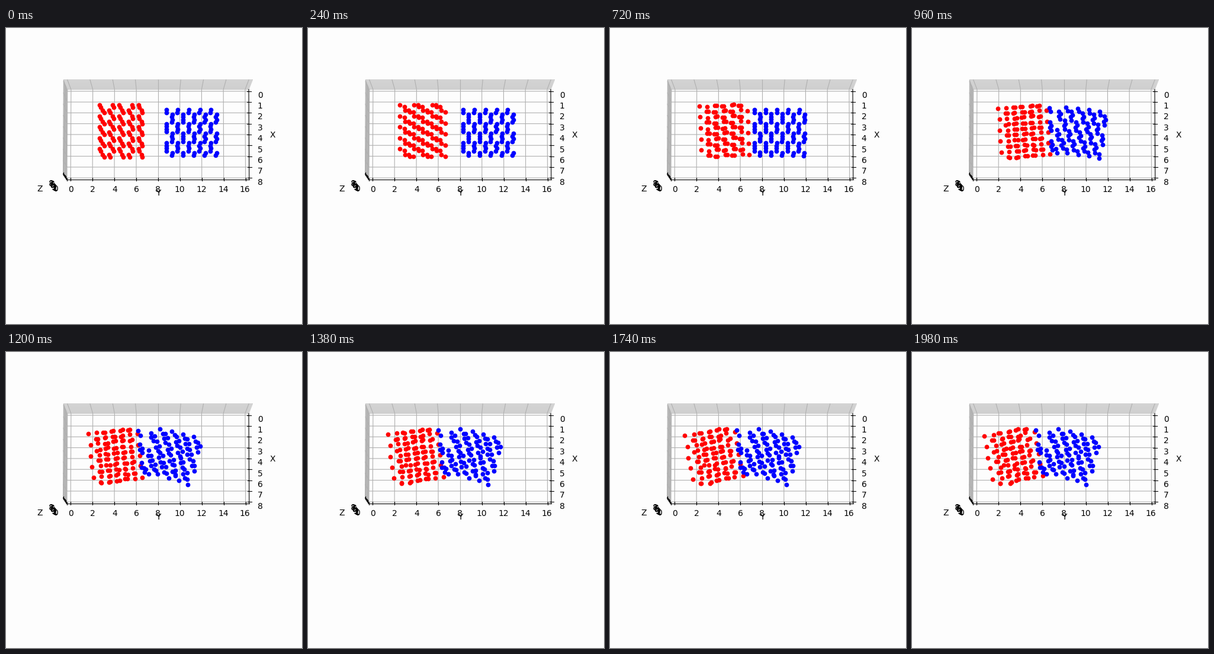
Recreate the animation shown at these times as a matplotlib script. Size 500 by 500 pixels, loop 2040 ms.

```python
import numpy as np
import matplotlib.pyplot as plt
from matplotlib.animation import FuncAnimation

FRAMES, STEP = 34, 60
BG = "#fdfdfd"

fig = plt.figure(figsize=(5, 5), dpi=100, facecolor=BG)
ax = fig.add_axes([0, 0, 1, 1])
ax.set(xlim=(0, 500), ylim=(500, 0))
ax.axis("off")

# ---- box seen from almost straight above ----
TILT = np.radians(85)
LO, HI = -1 / 6, 49 / 6          # x and z limits; y is twice as long


def proj(x, y, z):
    wx = ((x / 2 - LO) / (HI - LO) - 0.5) * 1.143
    wy = (y - 8) / (2 * (HI - LO)) * 1.143
    wz = ((z / 2 - LO) / (HI - LO) - 0.5) * 0.857
    up = wz * np.cos(TILT) - wx * np.sin(TILT)
    depth = 10 - wx * np.cos(TILT) - wz * np.sin(TILT)
    return 256.9 + 2805 * wy / depth, 243.5 - 2805 * up / depth


def path(*pts, color="#b0b0b0", order=1):
    xs, ys = zip(*(proj(*p) for p in pts))
    ax.plot(xs, ys, color=color, lw=0.8, zorder=order)


def tick(x, y, left=0, right=0, above=0, below=0):
    ax.plot([x - left, x + right], [y - above, y + below],
            color="black", lw=0.8, zorder=3)


def label(x, y, s):
    ax.text(x, y + 5, s, fontsize=10, family="DejaVu Sans",
            ha="center", va="baseline", zorder=6)


for k in range(9):
    path((k, 2 * LO, HI), (k, 2 * LO, LO), (k, 2 * HI, LO))
    path((LO, 2 * k, HI), (LO, 2 * k, LO), (HI, 2 * k, LO))
    path((HI, 2 * LO, k), (LO, 2 * LO, k), (LO, 2 * HI, k))

    tick(*proj(k, 2 * HI, LO), left=3, right=4)
    tick(*proj(HI, 2 * k, LO), above=3, below=2)
    tick(*proj(HI, 2 * LO, k), above=2.5, below=1.3)

    label(429, 112.6 + 18.4 * k, str(k))
    label(109.75 + 36.75 * k, 272, str(2 * k))
    label(84 - k, 271 - 1.1 * k, str(k))

corner = (HI, 2 * LO, LO)
path((LO, 2 * HI, LO), (HI, 2 * HI, LO), color="black", order=2)
path(corner, (HI, 2 * HI, LO), color="black", order=2)
path(corner, (HI, 2 * LO, HI), color="black", order=2)
label(450, 180, "X")
label(257, 278, "Y")
label(57.2, 270.5, "Z")

# ---- two crystals, each made of two stacked layers ----
J, I = np.meshgrid(np.arange(10), np.arange(5))
PAIR = (J + 1) // 2
SIDE = np.where(J % 2, -0.5, 0.5)
ALONG = I - 2 + (PAIR % 2 - 0.5) / 2     # every other pair sits half a cell on

rng = np.random.default_rng(4)
RED_NOISE, BLUE_NOISE = rng.normal(0, 0.8, (2, 100, 2))


def ramp(t, start, end):
    return np.clip((t - start) / (end - start), 0, 1)


def ease(t, start, end):
    p = ramp(t, start, end)
    return p * p * (3 - 2 * p)


def paired(pitch, gap):
    return (PAIR - 2.5) * pitch + SIDE * gap


def rotate(u, v, degrees):
    c, s = np.cos(np.radians(degrees)), np.sin(np.radians(degrees))
    return u * c - v * s, u * s + v * c


def layers(x, y, dx, dy):
    """Stack the lower layer, slightly smaller and shifted, under the upper."""
    low_x = 256 + (x - 256) * 0.98 + dx
    return np.column_stack([np.r_[low_x.ravel(), x.ravel()],
                            np.r_[(y + dy).ravel(), y.ravel()]])


def red_dots(t):
    # the layers slide apart, then the impact pushes and turns the block
    slide, push, hit = ramp(t, 0, 420), ramp(t, 720, 1980), ease(t, 600, 1200)
    u = paired(16.5 - 2 * slide, 11 - 7.5 * slide)
    x, y = rotate(u, 18.6 * ALONG - 0.2, -11 * ramp(t, 420, 1800))
    xy = layers(x + 193.5 - 6 * slide - 24 * push, y + 172 + 4.5 * hit,
                0.5 + 10 * slide + 4 * push, 4 - 2 * slide - 4 * hit)
    return xy + RED_NOISE * hit


def blue_dots(t):
    # fast approach, slower drift after the impact
    turn = ease(t, 660, 1260)
    u, v = 18.84 * ALONG, paired(16.3, 9)
    x, y = rotate(u, v, 16.5 * turn)
    x = x + 313.5 - 32 * ramp(t, 0, 850) - 19.5 * ramp(t, 850, 1980)
    y = y + 174.5 - 5.5 * turn
    # the leading edge is dragged along by the other crystal
    drag = turn * np.exp(-(u - u.min()) / 9)
    xy = layers(x + drag * (0.38 * v - 8), y + 11 * drag,
                4 * turn, 4.5 + 2.5 * turn)
    return xy + BLUE_NOISE * turn


def dots(color, order):
    return ax.scatter([], [], s=31, c=color, linewidths=0, zorder=order)


red, blue = dots("#ff0000", 4), dots("#0000ff", 5)


def update(n):
    t = n * STEP
    red.set_offsets(red_dots(t))
    blue.set_offsets(blue_dots(t))
    return red, blue


anim = FuncAnimation(fig, update, frames=FRAMES, interval=STEP,
                     repeat=True, repeat_delay=0, blit=False)
plt.show()
```
